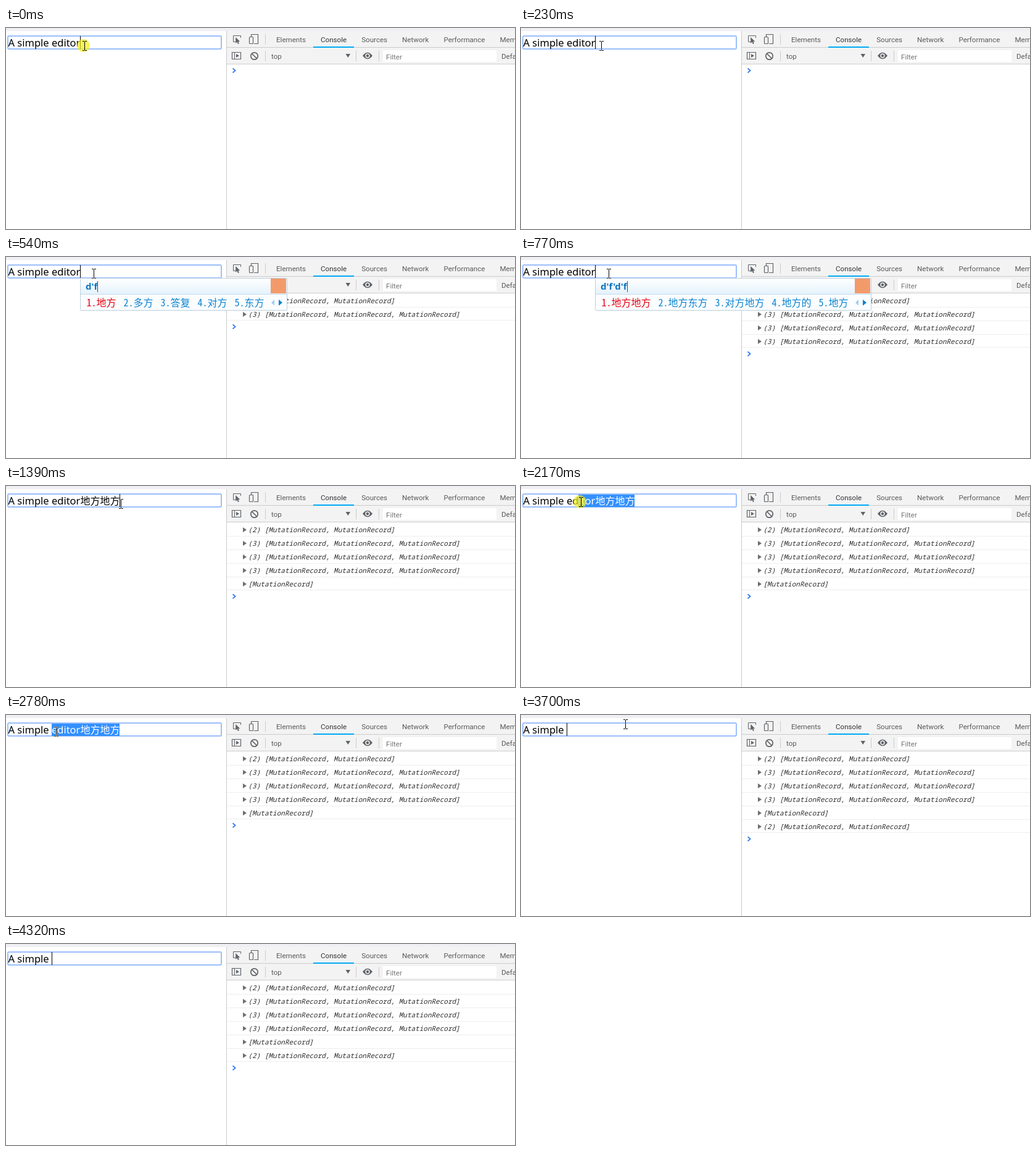
Recreate the animation shown at these times as an HTML page with a canvas. Size 825 by 326 pixels, loop 4780 ms.

```html
<!DOCTYPE html>
<html lang="en">
<head>
<meta charset="utf-8">
<title>Editor and console</title>
<style>
html, body { margin: 0; width: 100%; height: 100%; overflow: hidden; background: #fff; }
canvas { display: block; }
</style>
</head>
<body>
<canvas id="stage" width="825" height="326"></canvas>
<script>
const ctx = document.getElementById('stage').getContext('2d');
const LOOP = 4780;
const STEP = LOOP / 62; // the picture advances in equal steps

const UI = '11.6px Roboto, sans-serif';
const MONO = 'italic 11px "Noto Sans Mono", monospace';
const LATIN = '16.5px "Noto Sans", sans-serif';
const HAN = '16px "Noto Sans CJK SC", "Noto Sans CJK", sans-serif';
const LIST = '16px "Noto Sans Mono CJK SC", "Noto Sans CJK SC", monospace';
const KEYS = 'bold 15px "Noto Sans", sans-serif';

const PREFIX = 'A simple ';
const FULL = 'A simple editor';
const COMMITTED = '地方地方';
const KEYSTROKES = "d'f'd'f";
const CANDIDATES = [
  '的 都 到 大 点',
  '地方 多方 答复 对方 东方',
  '地方的 对方的 东方的 地方 多方',
  '地方地方 地方东方 对方地方 地方的 地方'
];

// Events, in steps
const TYPE = 4, TYPE_EVERY = 2, COMMIT = 13, PRESS = 23, RELEASE = 36, ERASE = 42, LEAVE = 52, GONE = 56;

// Pointer path: step, x, y
const PATH = [
  [2, 127, 29], [7, 142, 27], [15, 142, 27], [18, 186, 29], [21, 213, 30], [PRESS, 213, 30],
  [28, 97, 26], [32, 81, 27], [44, 81, 27], [48, 169, 15], [50, 178, 27], [51, 178, 27], [55, 616, 307]
];

const ink = '#5f6368';

function rect(x, y, w, h, color) {
  ctx.fillStyle = color;
  ctx.fillRect(x, y, w, h);
}

function text(str, x, y, font, color) {
  ctx.font = font;
  ctx.fillStyle = color;
  ctx.fillText(str, x, y);
}

function widthOf(str, font) {
  ctx.font = font;
  return ctx.measureText(str).width;
}

function line(points, color, width) {
  ctx.beginPath();
  points.forEach(([x, y]) => ctx.lineTo(x, y));
  ctx.strokeStyle = color;
  ctx.lineWidth = width;
  ctx.stroke();
}

function box(x, y, w, h, radius, color, width) {
  ctx.beginPath();
  ctx.roundRect(x, y, w, h, radius);
  ctx.strokeStyle = color;
  ctx.lineWidth = width;
  ctx.stroke();
}

function disc(x, y, r, color) {
  ctx.beginPath();
  ctx.arc(x, y, r, 0, 7);
  ctx.fillStyle = color;
  ctx.fill();
}

// Triangle centred on x, y; turn 0 points right
function triangle(x, y, length, half, color, turn = 0) {
  ctx.save();
  ctx.translate(x, y);
  ctx.rotate(turn);
  ctx.beginPath();
  ctx.moveTo(-length / 2, -half);
  ctx.lineTo(length / 2, 0);
  ctx.lineTo(-length / 2, half);
  ctx.fillStyle = color;
  ctx.fill();
  ctx.restore();
}

function arrow(x, y, scale, fill, edge) {
  ctx.save();
  ctx.translate(x, y);
  ctx.scale(scale, scale);
  ctx.beginPath();
  [[0, 0], [0, 16], [4, 12.5], [6.5, 18.5], [9, 17.5], [6.5, 11.5], [11.5, 11.5]]
    .forEach(([px, py]) => ctx.lineTo(px, py));
  ctx.closePath();
  ctx.fillStyle = fill;
  ctx.fill();
  ctx.strokeStyle = edge;
  ctx.lineWidth = 1;
  ctx.stroke();
  ctx.restore();
}

function pointerAt(step) {
  const next = PATH.findIndex(([at]) => at > step);
  if (next === 0) return PATH[0].slice(1);
  if (next < 0) return PATH[PATH.length - 1].slice(1);
  const [a, ax, ay] = PATH[next - 1], [b, bx, by] = PATH[next];
  const k = (step - a) / (b - a);
  return [ax + (bx - ax) * k, ay + (by - ay) * k];
}

const keysTyped = step => Math.max(0, Math.min(4, Math.floor((step - TYPE) / TYPE_EVERY) + 1));

function drawIcons() {
  line([[372, 22.5], [368.5, 22.5], [368.5, 12.5], [380.5, 12.5], [380.5, 16]], ink, 1);
  arrow(372.5, 15.5, 0.55, ink, ink);
  line([[397.5, 14], [397.5, 10.5], [408.5, 10.5], [408.5, 25.5], [402, 25.5]], ink, 1.2);
  box(394.5, 14.5, 6, 11, 1, ink, 1.2);

  box(366.5, 39.5, 14, 11, 0, ink, 1.2);
  line([[370.5, 39], [370.5, 51]], ink, 1);
  triangle(375.5, 45, 5, 3, ink);
  box(396.8, 39.8, 11.4, 11.4, 5.7, ink, 1.7);
  line([[398.5, 41.5], [406.5, 49.5]], ink, 1.7);
  triangle(554.3, 45, 6, 3.8, ink, Math.PI / 2);

  ctx.beginPath();
  ctx.moveTo(578, 45);
  ctx.quadraticCurveTo(586, 34.5, 594, 45);
  ctx.quadraticCurveTo(586, 55.5, 578, 45);
  ctx.fillStyle = ink;
  ctx.fill();
  disc(586, 45, 3.7, '#f3f3f3');
  disc(586, 45, 2.2, ink);
}

function drawDevtools() {
  rect(0, 0, 825, 5, '#f0eff3');
  rect(357, 5, 1, 321, '#cbcbcb');
  rect(358, 5, 467, 54, '#f3f3f3');
  for (const y of [31, 58]) rect(358, y, 467, 1, '#cccccc');
  rect(420, 10, 1, 17, '#cccccc');
  for (const x of [420, 567, 604]) rect(x, 37, 1, 17, '#cccccc');
  rect(611, 36, 184, 19, '#fff');

  let x = 438;
  for (const name of ['Elements', 'Console', 'Sources', 'Network', 'Performance', 'Memory']) {
    const width = widthOf(name, UI);
    const active = name === 'Console';
    if (active) rect(Math.round(x - 12), 30, Math.round(width + 24), 2, '#03a9f4');
    text(name, x, 23, UI, active ? '#333' : '#5a5a5a');
    x += width + 24;
  }
  text('top', 430, 50, UI, '#5a5a5a');
  text('Filter', 616, 51, UI, '#757575');
  text('Default levels', 803, 50, UI, '#5a5a5a');
  drawIcons();
}

// The first key logs two records, later keys three, a commit one, a deletion two
function drawConsole(step) {
  const counts = [2, 3, 3, 3].slice(0, keysTyped(step));
  if (step >= COMMIT) counts.push(1);
  if (step >= ERASE) counts.push(2);
  counts.forEach((count, i) => {
    const y = 71 + 22 * i;
    const records = '[' + Array(count).fill('MutationRecord').join(', ') + ']';
    const last = i === counts.length - 1;
    triangle(387, y, 6, 4, '#6e6e6e');
    text((count > 1 ? `(${count}) ` : '') + records, 392.5, y + 4, MONO, '#303030');
    rect(358, y + (last ? 9 : 10), 467, 1, '#eeeeee');
  });
  const y = 69 + 22 * counts.length;
  line([[367.5, y - 3.5], [371.7, y], [367.5, y + 3.5]], '#367cf1', 1.7);
}

function caretOn(step) {
  let reset = 0;
  if (step >= ERASE) reset = ERASE;
  else if (step >= PRESS) reset = PRESS;
  else if (step >= COMMIT) reset = COMMIT;
  else if (step >= TYPE) reset = TYPE + TYPE_EVERY * (keysTyped(step) - 1);
  return (step - reset) * STEP % 1060 < 530;
}

function drawEditor(step, pointerX) {
  box(3, 13, 346, 21, 2, '#9bbffa', 2);
  const left = 3.5;
  const latin = step < ERASE ? FULL : PREFIX;
  const han = step >= COMMIT && step < ERASE ? COMMITTED : '';
  const hanX = left + widthOf(latin, LATIN);
  const end = hanX + 16 * han.length;
  const write = color => {
    text(latin, left, 30, LATIN, color);
    text(han, hanX, 30, HAN, color);
  };
  write('#000');

  // A drag selects from the character under the pointer to the end
  let start = end;
  if (step >= PRESS && step < ERASE) {
    const edges = [...latin].map((_, i) => left + widthOf(latin.slice(0, i), LATIN));
    for (let i = 0; i <= han.length; i++) edges.push(hanX + 16 * i);
    start = edges.filter(x => x <= pointerX - 2).pop();
  }
  if (start < end) {
    ctx.save();
    ctx.beginPath();
    ctx.rect(Math.round(start), 14, Math.round(end) - Math.round(start), 20);
    ctx.clip();
    rect(0, 14, 357, 20, '#3390ff');
    write('#fff');
    ctx.restore();
  } else if (caretOn(step)) {
    rect(Math.round(end), 13, 1, 21, '#000');
  }
}

function drawIme(step) {
  const count = keysTyped(step);
  if (!count || step >= COMMIT) return;
  const keys = KEYSTROKES.slice(0, 2 * count - 1);
  const words = CANDIDATES[count - 1].split(' ');
  const width = 176 + 16 * words.join('').length;
  const right = 120 + width;

  const shade = ctx.createLinearGradient(0, 35, 0, 60);
  shade.addColorStop(0, '#ffffff');
  shade.addColorStop(1, '#e4f2fc');
  rect(120, 34, width, 53, '#fbfdff');
  rect(120, 34, width, 26, shade);
  rect(121, 60, width - 2, 1, '#c3dcee');
  box(120.5, 34.5, width - 1, 52, 1, '#bccfdd', 1);
  rect(right - 27, 35, 25, 24, '#f39a6b');

  text(keys, 129, 53, KEYS, '#0d74bd');
  rect(Math.round(129 + widthOf(keys, KEYS)), 39, 1, 18, '#f00');

  let x = 130.5;
  words.forEach((word, i) => {
    text(`${i + 1}.${word}`, x, 80, LIST, i ? '#0a84d0' : '#e60012');
    x += 28 + 16 * word.length;
  });
  triangle(right - 23.5, 74, 5, 5, '#9fd0f2', Math.PI);
  triangle(right - 11, 74, 6, 5, '#0a84d0');
}

function drawBeam(x, y, pressed) {
  ctx.save();
  if (pressed) {
    ctx.globalAlpha = 0.7;
    disc(x - 1.5, y - 0.5, 10.5, '#f7ee1c');
    ctx.globalAlpha = 1;
  } else {
    ctx.globalCompositeOperation = 'difference';
  }
  const color = pressed ? '#000' : '#fff';
  rect(x, y - 7, 1, 14, color);
  for (const edge of [y - 8, y + 7]) {
    rect(x - 3, edge, 3, 1, color);
    rect(x + 1, edge, 3, 1, color);
  }
  ctx.restore();
}

function draw(step) {
  const [x, y] = pointerAt(step).map(Math.round);
  const pressed = step < 1 || (step >= PRESS && step < RELEASE);
  rect(0, 0, 825, 326, '#fff');
  drawDevtools();
  drawConsole(step);
  drawEditor(step, x);
  drawIme(step);
  if (step < LEAVE) drawBeam(x, y, pressed);
  else if (step < GONE) arrow(x + 0.5, y + 0.5, 1, '#fff', '#000');
}

const began = performance.now();
function tick() {
  const t = (performance.now() - began) % LOOP;
  draw(Math.floor((t + 5) / STEP) % 62); // step times are rounded to 10 ms
  requestAnimationFrame(tick);
}
tick();
</script>
</body>
</html>
```
